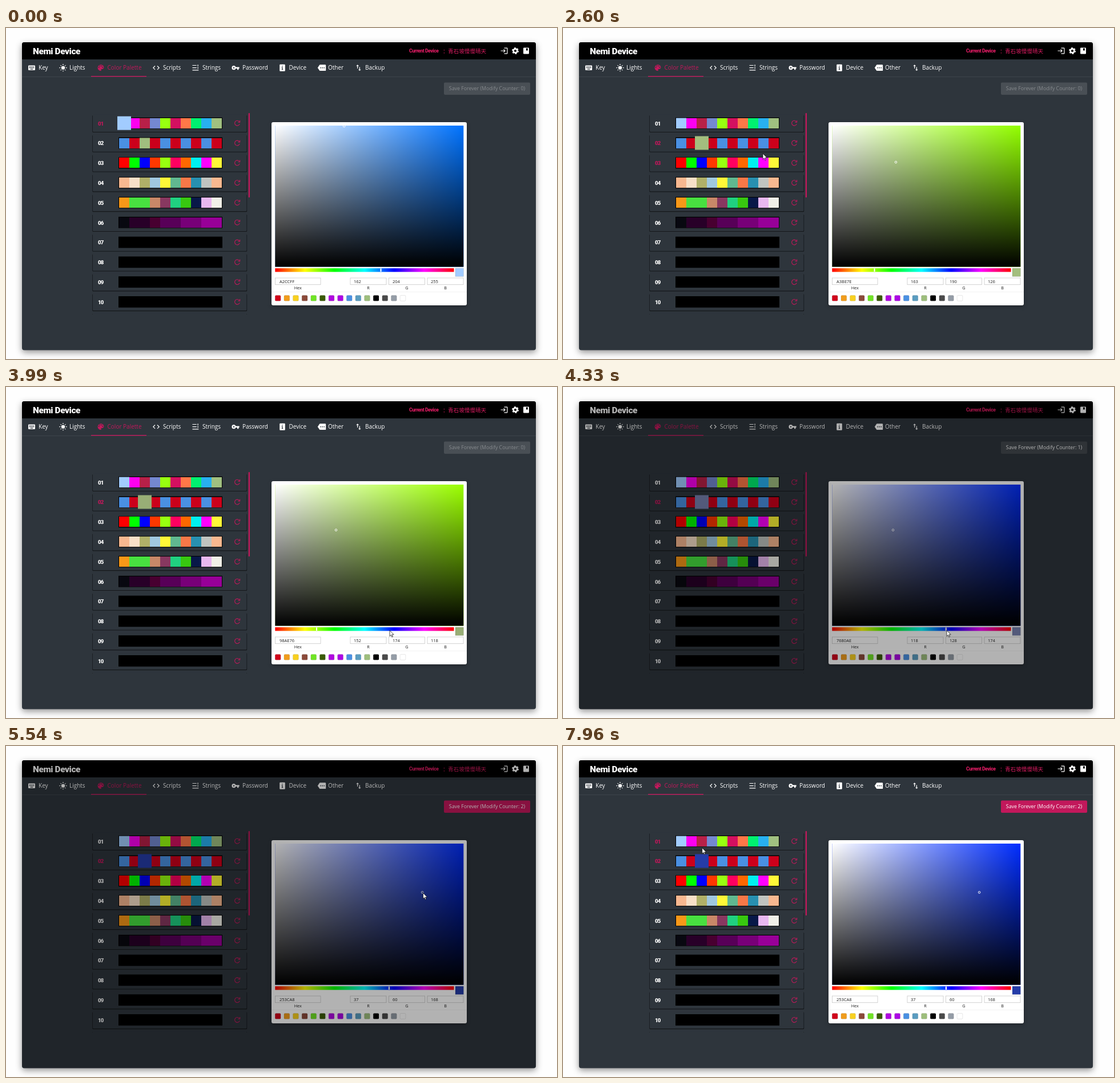
Animation of 965 by 580 pixels, one loop 8 s. Source, as an HTML page:

```html
<!DOCTYPE html>
<html lang="en">
<head>
<meta charset="utf-8">
<style>
html, body { margin: 0; width: 100%; height: 100%; overflow: hidden; background: #fefefe; }
svg { display: block; width: 965px; height: 580px; font-family: "Open Sans", "Noto Sans", sans-serif; }
.window { filter: drop-shadow(0 4px 6px rgba(0,0,0,.42)); }
.heavy { font-family: Impact, Roboto, sans-serif; font-weight: 900; }
.cjk { font-family: "Noto Sans CJK SC", "Noto Sans CJK", sans-serif; }
</style>
</head>
<body>
<svg id="stage" viewBox="0 0 965 580">
  <defs>
    <linearGradient id="toWhite"><stop stop-color="#fff"/><stop offset="1" stop-color="#fff" stop-opacity="0"/></linearGradient>
    <linearGradient id="toBlack" x2="0" y2="1"><stop stop-opacity="0"/><stop offset="1"/></linearGradient>
    <linearGradient id="rainbow"></linearGradient>
    <clipPath id="listClip"><rect x="140" y="149" width="284" height="353"/></clipPath>
  </defs>
</svg>
<script>
const NS = "http://www.w3.org/2000/svg";
const stage = document.getElementById("stage");
const PINK = "#c2185b", BG = "#2e353c";

function add(tag, attrs, parent = stage) {
  const el = document.createElementNS(NS, tag);
  set(el, attrs);
  parent.appendChild(el);
  return el;
}
function set(el, attrs) {
  for (const k in attrs) el.setAttribute(k, attrs[k]);
}
function box(x, y, width, height, fill, extra, parent) {
  return add("rect", { x, y, width, height, fill, ...extra }, parent);
}
function label(x, y, size, fill, text, extra, parent) {
  const el = add("text", { x, y, "font-size": size, fill, ...extra }, parent);
  el.textContent = text;
  return el;
}

// Window, header and navigation
box(28, 25, 900, 539.5, BG, { rx: 4, class: "window" });
add("path", { d: "M28 55V29a4 4 0 0 1 4-4H924a4 4 0 0 1 4 4V55z", fill: "#000" });
label(47, 45.5, 15.5, "#fff", "Nemi Device", { class: "heavy", "letter-spacing": -0.45 });
label(706, 43.3, 8.6, "#d81b60", "Current Device", { class: "heavy", "letter-spacing": -0.45 });
label(765, 43.5, 9.6, "#d81b60", "：", { class: "cjk" });
label(774, 43.5, 9.6, "#d81b60", "青石坡慢慢晴天", { class: "cjk" });
box(28, 85, 900, 1, "#3d444b");
box(149, 84, 97, 1.4, PINK);

const dots = [9, 14, 19].map(x => `M${x} 13.5a1.5 1.5 0 1 1 0-3 1.5 1.5 0 0 1 0 3z`).join("");
const keys = [5, 8, 11, 14, 17].map(x => `M${x} 8v2h2v-2zm0 3v2h2v-2z`).join("");
const hole = (x, y) => `M${x} ${y}a1.5 1.5 0 1 0 .01 0z`;
const shapes = {
  keyboard: { d: "M4 5H20a2 2 0 0 1 2 2V17a2 2 0 0 1-2 2H4a2 2 0 0 1-2-2V7a2 2 0 0 1 2-2zM8 15v2h8v-2z" + keys },
  sun: { d: "M12 6.5a5.5 5.5 0 1 0 .01 0zM11 1h2v3h-2zM11 20h2v3h-2zM1 11h3v2H1zM20 11h3v2h-3zM4 5.4 5.4 4l2 2L6 7.4zM16.6 18 18 16.6l2 2-1.4 1.4zM18.6 4 20 5.4l-2 2L16.6 6zM6 16.6 7.4 18l-2 2L4 18.6z" },
  palette: { d: "M12 3a9 9 0 0 0 0 18c.83 0 1.5-.67 1.5-1.5 0-.39-.15-.74-.39-1.01-.23-.26-.38-.61-.38-.99 0-.83.67-1.5 1.5-1.5H16c2.76 0 5-2.24 5-5 0-4.42-4.03-8-9-8z"
    + hole(6.5, 9) + hole(9.5, 5) + hole(14.5, 5) + hole(17.5, 9) },
  code: { d: "M9.4 16.6 4.8 12l4.6-4.6L8 6l-6 6 6 6zM14.6 16.6l4.6-4.6-4.6-4.6L16 6l6 6-6 6z" },
  list: { d: "M2 4h12v2H2zM2 11h12v2H2zM2 18h18v2H2zM17 3h2v5h-2zM17 10h2v5h-2z" },
  key: { d: "M12.65 10C11.83 7.67 9.61 6 7 6a6 6 0 0 0 0 12c2.61 0 4.83-1.67 5.65-4H17v4h4v-4h2v-4zM7 14a2 2 0 1 1 0-4 2 2 0 0 1 0 4z" },
  device: { d: "M6 2H18a2 2 0 0 1 2 2V20a2 2 0 0 1-2 2H6a2 2 0 0 1-2-2V4a2 2 0 0 1 2-2zM11 6v2.5h2V6zM10 10v2h1v4h-1v2h4v-2h-1v-6z" },
  more: { d: "M22 3H7c-.69 0-1.23.35-1.59.88L0 12l5.41 8.11c.36.53.97.89 1.66.89H22a2 2 0 0 0 2-2V5a2 2 0 0 0-2-2z" + dots },
  swap: { d: "M16 17V10h-2v7h-3l4 4 4-4zM9 3 5 7h3v7h2V7h3z" },
  login: { d: "M11 7 9.6 8.4 12.2 11H2v2h10.2l-2.6 2.6L11 17l5-5zM12 3v2h8v14h-8v2h8a2 2 0 0 0 2-2V5a2 2 0 0 0-2-2z" },
  book: { d: "M5 2H19a2 2 0 0 1 2 2V20a2 2 0 0 1-2 2H5a2 2 0 0 1-2-2V4a2 2 0 0 1 2-2zM12 4v8l2.5-1.7L17 12V4z" }
};
function icon(name, cx, cy, fill = "#fff", scale = 0.6) {
  add("path", { ...shapes[name], fill, "fill-rule": "evenodd",
    transform: `translate(${cx} ${cy}) scale(${scale}) translate(-12 -12)` });
}
[["keyboard", 45, "Key", 57], ["sun", 100, "Lights", 111], ["palette", 166, "Color Palette", 177.5],
 ["code", 263, "Scripts", 275], ["list", 332.5, "Strings", 344], ["key", 402, "Password", 414],
 ["device", 484, "Device", 495.5], ["more", 553, "Other", 564], ["swap", 617.5, "Backup", 629]
].forEach(([name, x, text, tx]) => {
  const color = name === "palette" ? PINK : "#fff";
  icon(name, x, 69.7, color);
  label(tx, 73.4, 10, color, text);
});
icon("login", 872.5, 40);
icon("book", 911, 40, "#fff", 0.55);
add("circle", { cx: 892, cy: 40, r: 3.4, fill: "none", stroke: "#fff", "stroke-width": 2.6 });
add("circle", { cx: 892, cy: 40, r: 5, fill: "none", stroke: "#fff", "stroke-width": 2, "stroke-dasharray": "2.62 2.62" });

const button = box(767, 95.5, 151, 21.5, "", { rx: 2 });
const buttonText = label(842.5, 109.3, 8.8, "", "", { "text-anchor": "middle" });

// Palette list
const palettes = [
  "a2ccff fc00f0 b82048 7488d0 98ff10 d41060 ff7848 00f070 28b0f0 a0c080",
  "4a90e2 cc001b a0be7f cc001b 4a90e2 cc001b 4a90e2 cc001b 4a90e2 cc001b",
  "ff0000 00ff00 0000ff ff3800 98ff10 ff0060 ff6800 00f0f0 ff00ff fff838",
  "f8b890 f8e0c8 b0b068 a0c8e0 fff838 60b890 f87848 2890b0 c0c4c0 f8b890",
  "f89818 48e040 48e040 c88868 883860 20d080 38c810 081848 e8b8f0 f0f0e8",
  "080810 280028 280028 480030 580058 580058 780078 780078 980098 980098"
].map(s => s.split(" "));
const rowY = i => 166.7 + 34.8 * i;
const list = add("g", { "clip-path": "url(#listClip)" });
const numbers = [];
for (let i = 0; i < 11; i++) {
  const y = rowY(i);
  box(151.3, y - 14, 270.9, 30.3, "#15181b", { rx: 1.5 }, list);
  box(152, y - 15.5, 269.4, 30.7, BG, { rx: 1.5 }, list);
  if (i > 9) break;
  numbers.push(label(161, y + 3.8, 9.6, "#fff", String(i + 1).padStart(2, "0"),
    { class: "heavy", "letter-spacing": -0.7 }, list));
  box(197, y - 9.9, 182, 19.8, "#000", {}, list);
  (palettes[i] || []).forEach((c, j) => box(198 + 18 * j, y - 9, 18, 18, "#" + c, { "shape-rendering": "crispEdges" }, list));
  add("path", { d: "M4.2 1.4A4.4 4.4 0 1 1 3.4-2.8M4.6-4.8V-1.6H1.4", transform: `translate(405 ${y})`,
    fill: "none", stroke: PINK, "stroke-width": 1.1 }, list);
}
const picked = box(0, 0, 0, 0, "");
const edited = box(0, 0, 0, 0, "");
box(424.7, 149, 2.3, 148, PINK, { rx: 1 });

// Colour picker
for (let i = 0; i < 7; i++) add("stop", { offset: i / 6, "stop-color": `hsl(${i * 60},100%,50%)` }, document.getElementById("rainbow"));
const SAT = { x: 471.3, y: 171, w: 330, h: 247.5 };
box(465, 165, 342, 321, "#fff", { rx: 3, style: "filter:drop-shadow(0 2px 3px rgba(0,0,0,.3))" });
const satBase = box(SAT.x, SAT.y, SAT.w, SAT.h, "");
box(SAT.x, SAT.y, SAT.w, SAT.h, "url(#toWhite)");
box(SAT.x, SAT.y, SAT.w, SAT.h, "url(#toBlack)");
const ring = add("circle", { r: 1.8, fill: "none", stroke: "#fff", "stroke-width": 1 });
box(471.3, 421, 313.2, 6.4, "url(#rainbow)");
const hueMark = box(0, 421.5, 2.2, 5.4, "#fff");
const preview = box(787, 421, 14.3, 14.3, "", { stroke: "#000", "stroke-opacity": 0.2, "stroke-width": 0.6 });
const fields = [["Hex", 471.5, 79.5, 479], ["R", 603, 63, 609], ["G", 670.3, 63.3, 677], ["B", 738, 63, 744]]
  .map(([name, x, w, tx]) => {
    box(x, 438, w, 11.7, "#fff", { stroke: "#c8c8c8", "stroke-width": 0.8 });
    label(x + w / 2, 458, 7.3, "#222", name, { "text-anchor": "middle" });
    return label(tx, 446.6, 7.5, "#222", "");
  });
box(465, 462, 342, 0.7, "#eee");
"d0021b f09c1c f8d020 8b4a3a 70e424 3a5a05 b008e0 ac06e4 4a90e2 5a9cc0 9dbe7c 000000 4a4a4a 949ca6 ffffff"
  .split(" ").forEach((c, i) => box(471.3 + 15.63 * i, 468.5, 9.8, 9.8, "#" + c,
    { rx: 1.6, stroke: "#000", "stroke-opacity": 0.16, "stroke-width": 0.6 }));

const dim = box(28, 25, 900, 539.5, "#000", { rx: 4, opacity: 0.3 });

// Pointer
const pointer = add("g", {});
const outline = { fill: "#fff", stroke: "#000", "stroke-width": 0.7, "stroke-linejoin": "round" };
const arrow = add("path", { d: "M0 0V10.2L2.3 8 3.9 11.7 5.5 11 3.9 7.4H7.2z", ...outline }, pointer);
const hand = add("path", { d: "M-1 1a1 1 0 0 1 2 0V5l1-.3 1 .5 1 .1 1 .6 1 .3.6 1V9l-1.2 2.6V13H-.2V11.8L-3.6 7.6c-.6-1 .6-1.7 1.4-1L-1 7.7z", ...outline }, pointer);

// Each move: start, number of steps, from, to, downward bow
const STEP = 1040 / 6;
const moves = [
  [370, 7, [759, 463], [251, 207], 0],
  [1580, 2, [251, 207], [236.5, 205], 0],
  [2600, 3, [236.5, 205], [577, 250], 0],
  [3294, 2, [577, 250], [645.5, 425], 0],
  [3640, 2, [645.5, 425], [672, 426.5], 0],
  [4500, 3, [672, 426.5], [719, 258.5], 0],
  [5020, 1, [719, 258.5], [730.5, 257.5], 0],
  [6570, 7, [730.5, 257.5], [262, 212], 50],
  [7780, 2, [262, 212], [243.7, 178.5], 0]
];
function pointerAt(t) {
  const move = moves.filter(m => t >= m[0] - 1).pop();
  if (!move) return null;
  const [start, n, a, b, bow] = move;
  const i = Math.min(n, Math.floor((t - start + 6) / STEP) + 1);
  const u = start === 370 ? (i - 1) / (n - 1) : i / n;
  return [a[0] + (b[0] - a[0]) * u, a[1] + (b[1] - a[1]) * u + bow * Math.sin(Math.PI * u)];
}

// Latest entry whose time has come
const latest = (track, t) => track.filter(k => t >= k[0]).pop()[1];
const colors = [[0, "A2CCFF"], [2090, "A3BE7E"], [3120, "98AE76"], [4160, "7680AE"], [5540, "253CA8"]];
const counts = [[0, 0], [4330, 1], [5540, 2]];
const buttonLook = [[0, ["#494f55", "#878b8f"]], [4330, ["#43494f", "#fff"]], [4500, [PINK, "#fff"]]];
const growth = [[0, 1], [1580, 1.1], [1760, 1.2], [2090, 1.33]];

function hsv([r, g, b]) {
  const max = Math.max(r, g, b), d = max - Math.min(r, g, b);
  const h = max === r ? (g - b) / d : max === g ? 2 + (b - r) / d : 4 + (r - g) / d;
  return [(h * 60 + 360) % 360, d / max, max / 255];
}
function placeSwatch(el, row, col, scale, fill) {
  const size = 18 * scale;
  set(el, { x: 207 + 18 * col - size / 2, y: rowY(row) - size / 2, width: size, height: size, fill });
}

function draw(t) {
  const hex = latest(colors, t);
  const rgb = [0, 2, 4].map(i => parseInt(hex.substr(i, 2), 16));
  const [h, s, v] = hsv(rgb);
  const swapped = t >= 2090;
  const pos = pointerAt(t);

  set(satBase, { fill: `hsl(${h},100%,50%)` });
  set(ring, { cx: SAT.x + s * SAT.w + 0.5, cy: SAT.y + (1 - v) * SAT.h + 1 });
  set(hueMark, { x: 470.2 + h / 360 * 313.2 });
  set(preview, { fill: "#" + hex });
  [hex, ...rgb].forEach((value, i) => fields[i].textContent = value);

  placeSwatch(picked, 0, 0, swapped ? 1 : 1.33, "#a2ccff");
  placeSwatch(edited, 1, 2, latest(growth, t), swapped ? "#" + hex : "#a0be7f");

  const inList = pos && pos[0] > 152 && pos[0] < 422;
  const hover = inList ? Math.round((pos[1] - rowY(0)) / 34.8) : -1;
  numbers.forEach((el, i) => set(el, { fill: i === hover || i === +swapped ? PINK : "#fff" }));

  const [fill, ink] = latest(buttonLook, t);
  set(button, { fill });
  set(buttonText, { fill: ink });
  buttonText.textContent = `Save Forever (Modify Counter: ${latest(counts, t)})`;

  const busy = (t >= 4330 && t < 4500) || (t >= 5540 && t < 5720);
  set(dim, { visibility: busy ? "visible" : "hidden" });

  set(pointer, { visibility: pos ? "visible" : "hidden" });
  if (!pos) return;
  const onSwatch = inList && pos[0] > 198 && pos[0] < 378 && Math.abs(pos[1] - rowY(hover)) < 10;
  const canPick = onSwatch || (t < 2090 && hover === 1);
  set(pointer, { transform: `translate(${pos[0]} ${pos[1]})` });
  set(arrow, { display: canPick ? "none" : "inline" });
  set(hand, { display: canPick ? "inline" : "none" });
}

const begin = performance.now();
function tick() {
  draw((performance.now() - begin) % 8000);
  requestAnimationFrame(tick);
}
tick();
</script>
</body>
</html>
```
